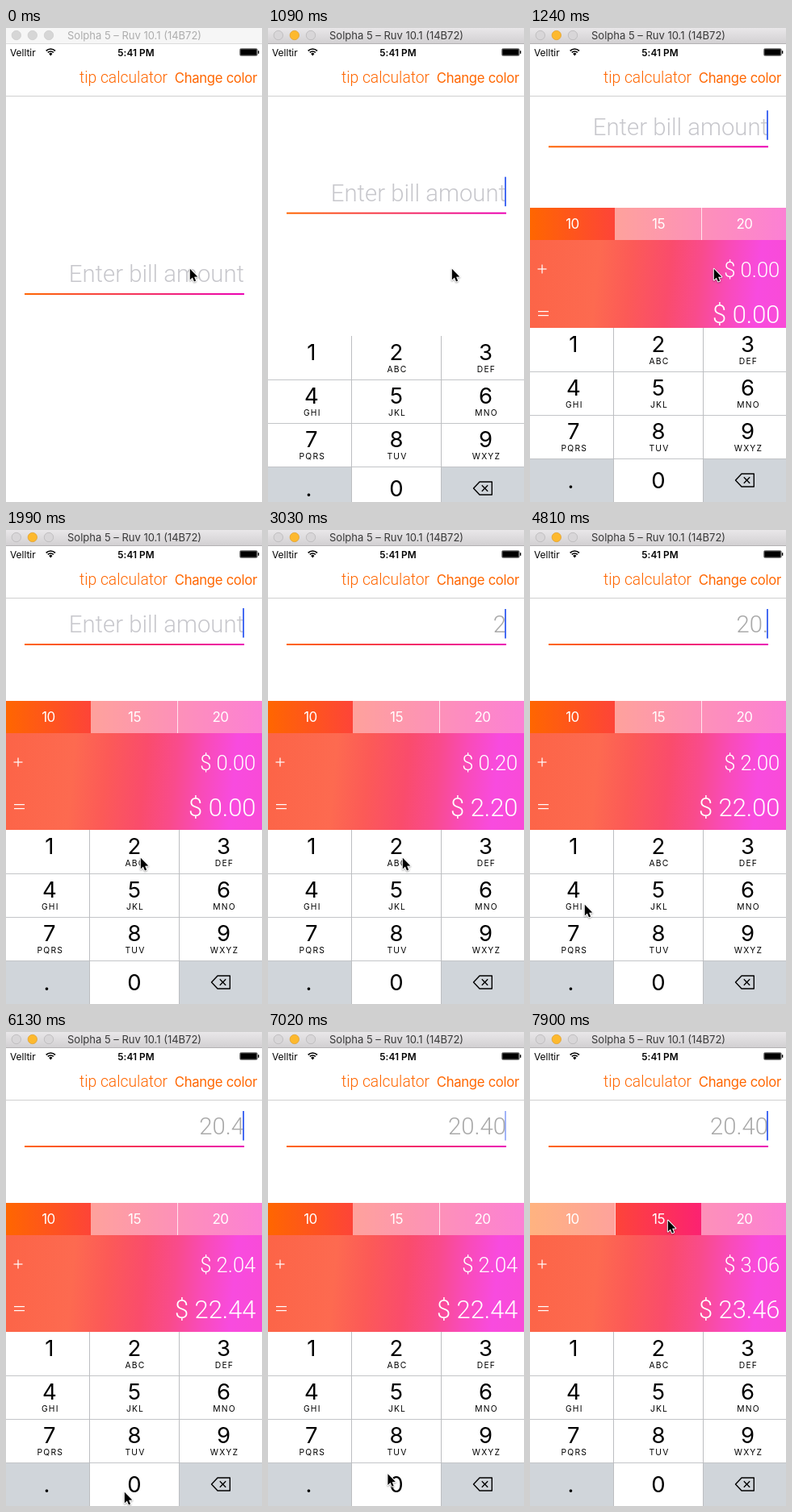
An HTML page with a canvas for the animation above (8 s loop, 317 by 588 pixels).

```html
<!DOCTYPE html>
<html lang="en">
<head>
<meta charset="utf-8">
<title>Tip calculator</title>
<style>
html, body { margin: 0; width: 100%; height: 100%; overflow: hidden; background: #fff; }
canvas { display: block; width: 317px; height: 588px; }
</style>
</head>
<body>
<canvas id="stage"></canvas>
<script>
const W = 317, H = 588, LOOP = 8000;
const canvas = document.getElementById('stage');
const ctx = canvas.getContext('2d');
const dpr = window.devicePixelRatio || 1;
canvas.width = W * dpr;
canvas.height = H * dpr;

const LIGHT = 'Roboto, "Open Sans", sans-serif';
const UI = 'Inter, Roboto, sans-serif';
const ORANGE = '#f60';

// Screen refreshes: [first, last, count]
const bursts = [
  [500, 500, 1], [950, 1990, 8], [2440, 2590, 2], [2890, 3920, 8],
  [4070, 5100, 8], [5550, 6130, 5], [6420, 6570, 2], [7020, 7900, 7]
];
// Pointer stops: [time, x, y]
const pointer = [
  [1240, 227, 298], [1840, 166, 406], [3040, 166, 406], [3400, 155, 568],
  [3640, 155, 568], [3773, 113, 559], [3920, 79, 566], [4080, 50, 568],
  [4370, 50, 568], [4806, 67, 464], [5420, 67, 464], [6130, 146, 570],
  [6900, 146, 570], [7620, 170, 233]
];
// Bill entry: [time, typed, tip, total]
const entries = [
  [0, '', '0.00', '0.00'], [3030, '2', '0.20', '2.20'], [3620, '20', '2.00', '22.00'],
  [4360, '20.', '2.00', '22.00'], [5090, '20.4', '2.04', '22.44'],
  [6560, '20.40', '2.04', '22.44'], [7740, '20.40', '3.06', '23.46']
];
// Key presses: [from, to, key]
const presses = [
  [2880, 3030, '2'], [3470, 3620, '0'], [4210, 4360, '.'], [4940, 5090, '4'], [6410, 6560, '0']
];
// Caret opacity changes: [time, alpha]
const blinks = [
  [0, 0], [940, 1], [2430, .5], [2580, 0], [2880, 1], [4060, .5], [4210, 0], [4360, 1],
  [5540, .5], [5690, 0], [5980, .5], [6120, 1], [7010, .5], [7160, 0], [7450, .5], [7600, 1]
];
const keys = [...'123456789.0', 'delete'];
const letters = ['', 'ABC', 'DEF', 'GHI', 'JKL', 'MNO', 'PQRS', 'TUV', 'WXYZ'];

const latest = (list, t) => list.filter(e => e[0] <= t).pop();
const ease = u => (1 - Math.cos(Math.PI * Math.min(1, Math.max(0, u)))) / 2;

function snap(t) {
  let shown = 0;
  for (const [a, b, n] of bursts) {
    for (let i = 0; i < n; i++) {
      const s = n > 1 ? a + (b - a) * i / (n - 1) : a;
      if (s - 10 <= t) shown = s;
    }
  }
  return shown;
}

function rect(x, y, w, h, fill) {
  ctx.fillStyle = fill;
  ctx.fillRect(x, y, w, h);
}

function dot(x, y, r, fill, stroke) {
  ctx.beginPath();
  ctx.arc(x, y, r, 0, Math.PI * 2);
  ctx.fillStyle = fill;
  ctx.fill();
  ctx.strokeStyle = stroke;
  ctx.lineWidth = .7;
  ctx.stroke();
}

function text(s, x, y, font, fill, align = 'left', spacing = 0) {
  ctx.font = font;
  ctx.fillStyle = fill;
  ctx.textAlign = align;
  ctx.letterSpacing = spacing + 'px';
  ctx.fillText(s, x, y);
}

function fade(x0, y0, x1, y1, colors) {
  const g = ctx.createLinearGradient(x0, y0, x1, y1);
  colors.forEach(([p, c]) => g.addColorStop(p, c));
  return g;
}

function path(points, closed) {
  ctx.beginPath();
  points.forEach(([x, y]) => ctx.lineTo(x, y));
  if (closed) ctx.closePath();
}

function titleBar(active) {
  rect(0, 0, W, 20, active ? fade(0, 0, 0, 20, [[0, '#e9e7e9'], [1, '#d1cfd1']]) : '#f6f6f6');
  rect(0, 19, W, 1, active ? '#b4b2b4' : '#dcdcdc');
  const grey = active ? '#d8d6d8' : '#d6d6d6', rim = active ? '#b5b3b5' : '#cbcbcb';
  dot(12.8, 9, 5.7, grey, rim);
  dot(32.8, 9, 5.7, active ? '#fdb92e' : grey, active ? '#dd9c2c' : rim);
  dot(53, 9, 5.7, grey, rim);
  text('Solpha 5 – Ruv 10.1 (14B72)', 76, 14, '400 13px ' + UI, active ? '#383838' : '#adadad');
}

function statusBar() {
  text('Velltir', 5, 34.5, '400 11.9px ' + UI, '#000');
  text('5:41 PM', 161, 34.5, '600 11.8px ' + UI, '#000', 'center', .1);
  ctx.strokeStyle = '#000';
  ctx.lineWidth = 1.7;
  for (const r of [8, 5]) {
    ctx.beginPath();
    ctx.arc(55.3, 34, r, -Math.PI * .75, -Math.PI * .25);
    ctx.stroke();
  }
  ctx.beginPath();
  ctx.moveTo(55.3, 34.6);
  ctx.arc(55.3, 34, 3, -Math.PI * .75, -Math.PI * .25);
  ctx.fillStyle = '#000';
  ctx.fill();
  ctx.lineWidth = .5;
  ctx.beginPath();
  ctx.roundRect(289.5, 25.5, 21.8, 9, 1.8);
  ctx.stroke();
  rect(290.2, 26.2, 20.4, 7.6, '#000');
  rect(312, 28.2, 1.3, 3.6, '#000');
}

function navBar() {
  text('tip calculator', 91, 68, '300 19.3px ' + LIGHT, ORANGE);
  text('Change color', 311, 68.3, '400 16.7px ' + UI, ORANGE, 'right', -.3);
  rect(0, 84, W, 1, '#cfcfcf');
}

function field(y, typed, caret) {
  const font = '300 29.3px ' + LIGHT;
  text(typed || 'Enter bill amount', 295, y - 14.6, font, typed ? '#a9a9a9' : '#c7c7cc', 'right');
  rect(23, y - 1, 272, 2, fade(23, 0, 295, 0, [[0, ORANGE], [1, '#eb00b4']]));
  ctx.globalAlpha = caret;
  rect(293, y - (typed ? 44 : 45), 2, 36.5, '#466bf2');
  ctx.globalAlpha = 1;
}

function panel(y, tip, total, selected) {
  const edges = [0, 105, 212, W];
  rect(0, y, W, 40, fade(0, 0, W, 0, [[0, ORANGE], [1, '#fa00aa']]));
  for (let i = 0; i < 3; i++) {
    if (i !== selected) rect(edges[i], y, edges[i + 1] - edges[i], 40, 'rgba(255,255,255,.5)');
    text(['10', '15', '20'][i], [52.5, 159, 265.5][i], y + 26.3, '400 17px ' + UI, '#fff', 'center', -.5);
  }
  rect(selected ? 105 : 212, y, 1, 40, 'rgba(255,255,255,.75)');

  rect(0, y + 40, W, 120, fade(0, y + 40, W, y + 70, [
    [0, '#fc6447'], [.27, '#fd6a50'], [.4, '#fc5a57'], [.55, '#fa4c6c'],
    [.67, '#f94b8c'], [.78, '#f94bb8'], [.9, '#f84bdf'], [1, '#f94bd8']
  ]));
  rect(9.5, y + 75.4, 11, 1.2, '#fff');
  rect(14.4, y + 70.5, 1.2, 11, '#fff');
  rect(10, y + 128, 13, 1.2, '#fff');
  rect(10, y + 133, 13, 1.2, '#fff');
  text('$ ' + tip, 309.3, y + 86, '300 25.6px ' + LIGHT, '#fff', 'right');
  text('$ ' + total, 309.5, y + 142.6, '300 30.9px ' + LIGHT, '#fff', 'right');
}

function backspace(x, y) {
  ctx.strokeStyle = '#000';
  ctx.lineWidth = 1.4;
  ctx.lineJoin = 'round';
  path([[x - 11.5, y], [x - 4, y - 8], [x + 11.3, y - 8], [x + 11.3, y + 8], [x - 4, y + 8]], true);
  ctx.stroke();
  for (const d of [-1, 1]) {
    path([[x - 1.2, y - 3.7 * d], [x + 6.2, y + 3.7 * d]]);
    ctx.stroke();
  }
}

function keyboard(y, pressed) {
  const edges = [0, 104, 214, W], centers = [53.8, 159, 269.5];
  rect(0, y, W, 216, '#fff');
  keys.forEach((key, i) => {
    const col = i % 3, row = Math.floor(i / 3), top = y + row * 54;
    const special = key === '.' || key === 'delete', down = key === pressed;
    rect(edges[col], top, edges[col + 1] - edges[col], 54, special !== down ? '#d0d5da' : '#fff');
    if (key === 'delete') {
      backspace(266, top + 27);
      return;
    }
    const x = key === '.' ? 50.5 : centers[col];
    text(key, x, top + (row === 3 ? 37 : 30), '400 27.5px ' + UI, '#000', 'center');
    if (letters[i]) text(letters[i], x + 1, top + 45, '400 10.3px ' + UI, '#000', 'center', 1.2);
  });
  for (let r = 1; r < 4; r++) rect(0, y + r * 54, W, 1, '#c3c5c8');
  rect(103, y, 1, 216, '#bcbec1');
  rect(214, y, 1, 216, '#bcbec1');
}

function arrow(t) {
  let [, x, y] = pointer[0];
  for (let i = 1; i < pointer.length; i++) {
    const [t0, x0, y0] = pointer[i - 1], [t1, x1, y1] = pointer[i];
    if (t < t0) break;
    const u = ease((t - t0) / (t1 - t0));
    x = x0 + (x1 - x0) * u;
    y = y0 + (y1 - y0) * u;
  }
  ctx.save();
  ctx.translate(x, y);
  ctx.shadowColor = 'rgba(0,0,0,.35)';
  ctx.shadowBlur = 2 * dpr;
  ctx.shadowOffsetY = dpr;
  path([[.8, .8], [.8, 14.5], [3.9, 11.6], [6, 16.4], [8.1, 15.5], [6.1, 10.8], [10.3, 10.6]], true);
  ctx.lineJoin = 'round';
  ctx.lineWidth = 2;
  ctx.strokeStyle = '#fff';
  ctx.stroke();
  ctx.shadowColor = 'transparent';
  ctx.fillStyle = '#000';
  ctx.fill();
  ctx.restore();
}

function draw(t) {
  const [, typed, tip, total] = latest(entries, t);
  const press = presses.find(([a, b]) => t >= a && t < b);
  const rise = ease((t - 890) / 400), slide = ease((t - 890) / 242);
  ctx.setTransform(dpr, 0, 0, dpr, 0, 0);
  rect(0, 0, W, H, '#fff');
  titleBar(t >= 500);
  statusBar();
  navBar();
  field(330 - 188 * rise, typed, latest(blinks, t)[1]);
  if (rise > 0) panel(Math.round(588 - 376 * rise), tip, total, t >= 7740 ? 1 : 0);
  if (slide > 0) keyboard(Math.round(588 - 216 * slide), press && press[2]);
  arrow(t);
}

function tick() {
  draw(snap(performance.now() % LOOP));
  requestAnimationFrame(tick);
}
tick();
</script>
</body>
</html>
```
